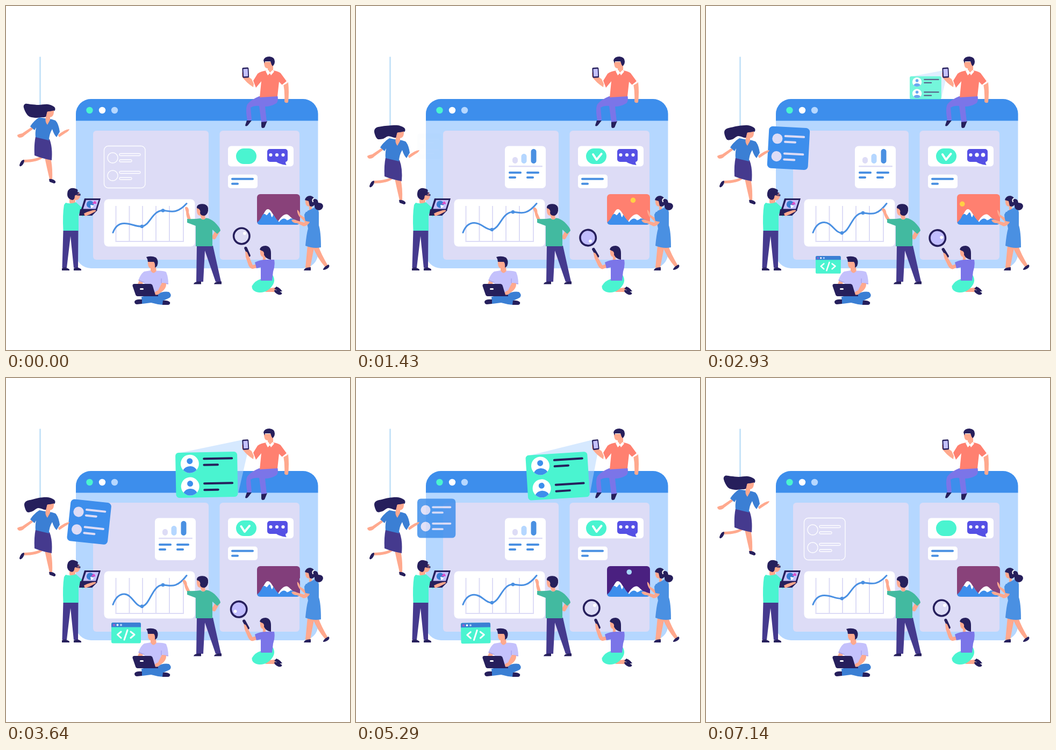
These frames come from a looping animation (640x640 px, 7210 ms). An HTML page:

```html
<!DOCTYPE html>
<html lang="en">
<head>
<meta charset="utf-8">
<title>Dashboard team</title>
<style>
html, body { margin: 0; width: 100%; height: 100%; overflow: hidden; background: #fff; }
svg { display: block; width: 100vw; height: 100vh; }
.navy { fill: #261f5c; } .skin { fill: #ffa98e; } .white { fill: #fff; }
.blue { fill: #3d8eec; } .denim { fill: #3b7fd4; } .sky { fill: #b5d7ff; }
.mist { fill: #dddcf6; } .mint { fill: #4af4d0; } .indigo { fill: #453a8e; }
.violet { fill: #7b75e8; } .coral { fill: #ff8070; } .green { fill: #42baa0; }
.lilac { fill: #c4c1fc; } .dress { fill: #4a90e2; }
.line { fill: none; stroke-width: 4; stroke-linecap: round; stroke-linejoin: round; }
.limb { fill: none; stroke: #ffa98e; stroke-width: 8; stroke-linecap: round; stroke-linejoin: round; }
.s-blue { stroke: #4a90e2; } .s-mist { stroke: #dddcf6; } .s-navy { stroke: #261f5c; } .s-white { stroke: #fff; }
</style>
</head>
<body>
<svg viewBox="0 0 640 640">
<defs>
  <clipPath id="photoClip"><rect x="467" y="350" width="80" height="57" rx="6"/></clipPath>
  <clipPath id="avatarClip"><circle cx="341.5" cy="158" r="17"/></clipPath>
  <g id="avatar">
    <circle class="white" cx="341.5" cy="158" r="17"/>
    <g class="blue" clip-path="url(#avatarClip)"><circle cx="341.5" cy="153" r="5.5"/><ellipse cx="341.5" cy="174" rx="13.5" ry="11.5"/></g>
  </g>
</defs>

<!-- browser window -->
<rect class="sky" x="130" y="173" width="450.500" height="315" rx="28"/>
<path class="blue" d="M130 213.500V201a28 28 0 0 1 28-28H552.500a28 28 0 0 1 28 28V213.500z"/>
<circle class="mint" cx="155.500" cy="194" r="6.200"/><circle class="white" cx="179" cy="194" r="6.200"/><circle class="sky" cx="202" cy="194" r="6.200"/>
<rect class="mist" x="162" y="232" width="215" height="240" rx="6"/>
<rect class="mist" x="397.500" y="232" width="148.500" height="240" rx="6"/>
<g id="trims"></g>

<!-- line chart -->
<rect class="white" x="182.500" y="359.500" width="169" height="88" rx="8"/>
<path class="s-mist" fill="none" stroke-width="2" d="M204.500 372V438H330V372M229.500 372V438M254 372V438M279 372V438M304 372V438"/>
<path id="curve" class="line s-blue" style="stroke-width:3"/>
<circle id="dotA" class="dress" cx="253" r="3.300"/><circle id="dotB" class="dress" cx="292" r="3.300"/>

<!-- status and chat -->
<rect class="white" x="413" y="260.500" width="122" height="38" rx="6"/>
<rect class="mint" x="428" y="265" width="38" height="29" rx="14.500"/>
<path id="check" class="line s-white" d="M439.500 276L446 286L455 275" pathLength="1" stroke-dasharray="1 2"/>
<path fill="#5550e5" d="M491 266H519a5 5 0 0 1 5 5V285a5 5 0 0 1-4 5q0 4 2 6q-12-1-19-6H491a5 5 0 0 1-5-5V271a5 5 0 0 1 5-5z"/>
<g id="dots" class="white"><circle cx="492.500" cy="277"/><circle cx="504" cy="277"/><circle cx="515.500" cy="277"/></g>
<rect class="white" x="413" y="313.500" width="55" height="25.500" rx="5"/>
<path class="line s-blue" d="M421 321.700H459M421 330.700H431"/>

<!-- landscape -->
<g clip-path="url(#photoClip)">
  <rect id="dusk" x="467" y="350" width="80" height="57"/>
  <circle id="sun" r="4.800" fill="#ffd045"/><circle id="moon" r="4.800" fill="#a8d6f8"/>
  <path class="white" d="M467 406C477 396 481 378 487 378S496 388 506 401C513 390 518 387.500 522 387.500S531 395 540 402L547 407H467z"/>
  <path class="blue" d="M467 407V403C472 399 475 394 477 389Q481 385 483 388T488 386T493 389T497 388Q502 396 508 402Q513 395 517 395.500T522 398T530 395Q538 396 547 403V407z"/>
</g>

<!-- blue profile card -->
<g id="profile">
  <rect class="blue" x="114" y="222" width="76" height="78" rx="7"/>
  <circle class="mist" cx="130.500" cy="244.500" r="9.600"/><circle class="mist" cx="130.500" cy="277.500" r="9.600"/>
  <path class="line s-mist" d="M145 239H179.500M145 249.700H164M145 271.500H179.500M145 282.500H164"/>
</g>

<!-- woman on the rope -->
<path id="rope" stroke="#b5dbf6" stroke-width="2.200"/>
<g id="flyer">
  <path class="skin" d="M48 225L30 237Q24 238 21 240Q21 244 25 245Q31 245 34 241L50 229zM97 240Q108 230 118 229Q117 233 111 236L99 244zM67 278Q59 285 33 286L32 291Q61 291 70 281zM72 282Q76 301 81 322H86Q87 300 83 283z"/>
  <path class="navy" d="M33 286Q28 286 25 296Q25 299 28 298Q34 294 34 287zM80 322Q87 321 92 326Q93 330 89 330L81 327z"/>
  <path class="indigo" d="M55 243L81 248Q87 263 85 287Q68 284 53 278Q52 257 55 243z"/>
  <path class="denim" d="M62 207Q52 213 45 224L53 231L56 226Q54 236 55 244L80 250Q80 239 86 229Q89 239 94 244L100 234Q98 219 92 213Q85 210 78 210z"/>
  <path id="hair" class="navy"/>
  <path class="skin" d="M75 197L89 194Q90 206 82 207L82 212L77 221Q72 215 74 207z"/>
  <path class="navy" d="M72 191Q82 182 91 193Q85 197 77 195L74 207z"/>
</g>

<!-- man with tablet -->
<path class="skin" d="M118 358H129V367Q123 371 118 366z"/>
<path class="mint" d="M111 366Q121 369 130 365Q140 373 149 384L143 392L135 386V418H106.500Q105 388 108 370z"/>
<path class="indigo" d="M106.500 418H134.500L134 487H126L120 428L113 487H104.500z"/>
<path class="navy" d="M104 492V488Q110 484 118 490V492zM126 492V488Q134 484 140 490V492zM146 358H176L169 381H139zM138 378L170 380L160 390H136z"/>
<path class="lilac" d="M149 361H172.500L167 377.500H143.500z"/>
<circle class="denim" cx="156.500" cy="369" r="6.700"/>
<path id="slice" fill="#d94fc5" d="M160 368L165 362.500Q169 365 168 368z"/>
<path class="white" d="M157 370L163.500 371Q162 375 158 376z"/>
<path class="skin" d="M145 386Q157 380 166 379.500Q169 381 165 383Q157 388 147 391z"/>
<g id="tabletHead">
  <path class="skin" d="M126 346H136L138 354Q136 362 128 361z"/>
  <path class="navy" d="M133 346Q135 341 130 340Q120 336 115 344Q111 358 123 361Q128 361 128 353Q131 350 137 347z"/>
  <path class="line s-navy" style="stroke-width:1.300" d="M127 350H138V352H133z"/>
</g>

<!-- code window and man with laptop -->
<g id="code">
  <rect class="mint" x="196" y="455" width="55" height="38.500" rx="3"/>
  <path class="denim" d="M196 463.500V458a3 3 0 0 1 3-3H248a3 3 0 0 1 3 3V463.500z"/>
  <circle cx="201" cy="459.500" r="1.900" fill="#a35bc9"/><circle class="white" cx="207.500" cy="459.500" r="1.900"/><circle class="sky" cx="214" cy="459.500" r="1.900"/>
  <path class="line s-white" style="stroke-width:3" d="M214 472L207.500 477.500L214 483.500M226 469L220 487M232 472L239 477.500L232 483.500"/>
</g>
<path class="limb" d="M252 511L249 518"/>
<path class="skin" d="M264 474H279V486L280 495Q274 503 269 494V488Q263 487 264 474z"/>
<path class="lilac" d="M257 494Q264 493 269 492Q274 501 280 492.500Q294 492 298 495Q302 504 302 517L290 514L287 535H258V515L246 511Q250 499 257 494z"/>
<path fill="none" stroke="#a9a4ef" stroke-width="1.500" d="M247 510L258 515M289 507V515L302 517"/>
<path class="navy" d="M261 467Q271 464 279 468Q285 474 281 484L277 487Q278 479 275 476H264Q264 471 261 467z"/>
<path class="denim" d="M252 541Q270 537 280 537Q292 530 303 532Q310 538 304 543L293 548L292 556Q280 555 270 552L253 554z"/>
<path class="navy" d="M253 546Q241 545 239 550Q239 555 244 555L253 554zM292 548Q300 547 305 551Q306 555 302 556L291 556z"/>
<path class="skin" d="M290 515L298 516Q299 526 288 533Q280 540 275 537Q275 532 283 529z"/>
<path class="navy" d="M239 517H268Q272 517 273 521L278 537.500H283V540H245Q242 540 241 537L235.500 521Q235 517 239 517z"/>
<rect class="white" x="249" y="525" width="7" height="3" rx="1.500"/>

<!-- man at the chart -->
<path class="limb" d="M394 418L387 430"/>
<g id="pointer"><path class="skin" d="M341 402Q335 393 335 383L333 376Q333 373 337 374Q341 377 340 384L345 401z"/></g>
<path class="skin" d="M355 375H368L371 396Q364 402 362 390Q354 391 355 375z"/>
<path class="indigo" d="M355 446H385L400 513H390L370 455L367 513H354z"/>
<path class="navy" d="M349 517.500Q350 512 363 512.500V517.500zM387 517.500Q388 512 401 512.500V517.500z"/>
<path class="green" d="M337 396Q350 397 362 395Q367 400 372 394.500Q378 394 388 402Q399 413 399 418L393 424L384 416V447H353V409L337 403z"/>
<path class="navy" d="M355 376Q354 370 362 368.500Q374 367 376 376Q377 386 370 390Q362 391 361 385Q363 378 355 376z"/>

<!-- kneeling woman -->
<path class="skin" d="M480 526L500 524L503 532H483zM473 454H483V474H478V467Q472 466 473 454z"/>
<path class="mint" d="M474 508L495 499Q502 509 497 518Q487 534 471 533Q457 531 457.500 521Q463 511 474 508z"/>
<path class="navy" d="M503 522Q511 525 514 531L508 531L499 526zM500 528Q508 529 513.500 534Q513 538 507 537Q500 534 499 530z"/>
<g id="lens">
  <circle class="mist" cx="438.300" cy="428" r="14.700"/>
  <circle id="glass" fill="#c1bdff" cx="438.300" cy="428" r="14.700"/>
  <circle fill="none" class="s-navy" stroke-width="3.600" cx="438.300" cy="428" r="14.700"/>
  <circle id="glint" class="white" cx="444" cy="423" r="2.900"/>
  <path class="line s-navy" style="stroke-width:5.500" d="M446 450.500L452 464"/>
  <path class="skin" d="M445 457Q448 456 450 461L459 482L467 480V487L459 489Q454 489 451 482L446 467z"/>
</g>
<path class="violet" d="M463 477Q473 472 483 472L499 472Q501 483 497 494L495 511H474L474 486L466 488z"/>
<path class="navy" d="M472 453Q474 446 483 446Q493 447 493 460V472Q484 471 480 463Q481 456 475 455z"/>

<!-- woman at the landscape -->
<path class="skin" d="M559 396L547 388Q546 382 542 379Q541 385 546 392L557 402zM561 445H574L566 487H557zM570 446L581 446Q586 461 599 483L594 486Q579 469 570 446zM557 360H569V380H564V373Q556 373 557 360z"/>
<path class="navy" d="M554 492Q555 486 567 486V492zM590 491Q590 486 600 481Q603 483 600 487Q595 491 590 491z"/>
<path class="dress" d="M561 381Q567 379 575 374Q582 378 582 384L582 408Q586 420 586 449Q572 452 557 446Q559 424 562 414L557 390z"/>
<path class="skin" d="M566 400Q563 408 554 410Q544 405 541 404Q533 404 531 398Q536 396 541 399L555 403L558 395z"/>
<path class="dress" d="M558 383L570 382L567 402L557 400Q555 393 555 388z"/>
<path class="navy" d="M556 361Q558 353 566 353Q572 354 574 359Q580 358 581 366Q590 366 590 373Q588 380 582 380Q573 379 574 370Q570 375 565 372L563 363z"/>
<path class="line s-white" style="stroke-width:2" d="M573 358Q569 360 571 364"/>

<!-- projected contacts -->
<g id="projection">
  <path id="beam" fill="#b5d7ff" opacity=".55"/>
  <g id="contacts">
    <rect class="mint" x="315" y="137" width="115" height="84" rx="6"/>
    <use href="#avatar"/><use href="#avatar" y="42"/>
    <path class="line s-navy" d="M368 149H420M368 160.500H393.500M368 195H420M368 207H393.500"/>
  </g>
</g>

<!-- man with phone -->
<path class="skin" d="M516 145L525 142Q527 160 525 179Q521 182 518 178Q519 160 516 145zM439 124Q442 122 449 129Q453 134 457 136L461 145L460 151Q446 142 439 131z"/>
<path class="skin" d="M480 104H497V120L494 126H487V116Q480 117 480 104z"/>
<path class="navy" d="M448 213H457L450 222Q446 225 445 222zM475 214H486L481 226Q475 229 475 223z"/>
<path class="violet" d="M471 168H505.500Q507 177 503 181Q493 187 482 187L485 215L475 216L471 186Q462 185 455 189L457 212L449 213Q445 191 449 183Q456 174 471 168z"/>
<path class="coral" d="M468 126Q474 121 486 120L491 126L496 120Q506 121 511 125L522 140L514 147L508 141L505 168L472 170L475 140L465 152L460 139Z"/>
<path class="white" d="M483 121L488 119L491 124L496 119L499 122L493 129L491 125L487 129zM513 147L522 140L524 143L515 148z"/>
<path class="navy" d="M479 101Q481 94 490 94Q500 95 500 103Q500 109 496 112L494 109L492 103H482L481 107z"/>
<g id="phone"><rect class="navy" x="439.800" y="114.500" width="12" height="19" rx="2" transform="rotate(-3 446 124)"/><rect class="lilac" x="441.800" y="117" width="8.200" height="14" transform="rotate(-3 446 124)"/></g>
</svg>
<script>
const LOOP = 7210;
const $ = id => document.getElementById(id);
const set = (node, attrs) => { for (const k in attrs) node.setAttribute(k, attrs[k]); };
const clamp = u => Math.max(0, Math.min(1, u));
const mix = (a, b, u) => a + (b - a) * u;
const ease = u => (1 - Math.cos(Math.PI * clamp(u))) / 2;
const ramp = (t, start, end) => ease((t - start) / (end - start));

// Finds the step around t and blends its two values.
function track(t, steps, curve = ease, blend = mix) {
  let i = 0;
  while (i < steps.length - 2 && t >= steps[i + 1][0]) i++;
  const [t0, a] = steps[i], [t1, b] = steps[i + 1];
  return blend(a, b, curve(clamp((t - t0) / (t1 - t0))));
}
const linear = u => u;

// Anticlockwise outline; turn = 1 starts one corner later.
function outline(x, y, w, h, r, turn = 0) {
  const centres = [[x + w - r, y + h - r], [x + w - r, y + r], [x + r, y + r], [x + r, y + h - r]];
  const pts = [];
  for (let k = 0; k < 4; k++) {
    const c = (k + turn) % 4;
    for (let j = 0; j <= 8; j++) {
      const a = Math.PI / 2 * (1 - c - j / 8);
      pts.push([centres[c][0] + r * Math.cos(a), centres[c][1] + r * Math.sin(a)]);
    }
  }
  return [...pts, pts[0]];
}

function trimmed(pts, share) {
  if (share <= 0) return '';
  const size = (p, q) => Math.hypot(q[0] - p[0], q[1] - p[1]);
  let left = share * pts.slice(1).reduce((sum, p, i) => sum + size(pts[i], p), 0);
  const out = [pts[0]];
  for (let i = 1; i < pts.length && left > 0; i++) {
    const [p, q] = [pts[i - 1], pts[i]], len = size(p, q), u = len ? Math.min(1, left / len) : 1;
    out.push([mix(p[0], q[0], u), mix(p[1], q[1], u)]);
    left -= len;
  }
  return 'M' + out.map(p => p.map(v => v.toFixed(2)).join(' ')).join('L');
}

function addTrim(pts, attrs) {
  const node = document.createElementNS('http://www.w3.org/2000/svg', 'path');
  set(node, attrs);
  $('trims').append(node);
  return { node, pts };
}
const wire = { fill: 'none', stroke: '#fff', 'stroke-width': 1.3 };
const wires = [addTrim(outline(182.5, 260.5, 76.5, 78, 8), wire)];
for (const y of [282.5, 315.5]) {
  wires.push(addTrim(outline(189, y - 9.5, 19, 19, 9.5, 1), wire));
  wires.push(addTrim(outline(211, y - 8, 39, 4, 1.9), wire));
  wires.push(addTrim(outline(211, y + 3.5, 23, 4, 1.9), wire));
}
const solids = [
  [277, 260.5, 76, 78.5, 7, '#fff'],
  [291, 281, 10, 12, 5, '#dddcf6'], [307.5, 275, 10, 18, 5, '#b5d7ff'], [325.5, 266, 10, 27, 5, '#4a90e2'],
  [284, 297, 63, 2.6, 1.3, '#dddcf6'],
  ...[284, 317].flatMap(x => [[x, 308, 24, 4, 2, '#4a90e2'], [x, 317, 14, 4, 2, '#4a90e2']])
].map(([x, y, w, h, r, fill]) => addTrim(outline(x, y, w, h, r), { fill }));

const hairRoot = [74, 206, 78, 197, 90, 195, 90, 188, 78, 183];
const hairPose = {
  rest: [61, 184, 47, 183, 36, 182, 33, 189, 41, 204, 54, 208, 64, 207],
  lifted: [61, 179, 50, 172, 38, 171, 33, 180, 41, 195, 54, 202, 65, 205],
  level: [61, 184, 49, 187, 38, 190, 34, 197, 39, 210, 49, 209, 60, 203],
  hanging: [61, 187, 52, 194, 44, 198, 40, 209, 44, 219, 53, 213, 62, 208]
};
const hairSteps = [[0, 'rest'], [790, 'lifted'], [1600, 'level'], [5600, 'level'], [6430, 'hanging'], [7140, 'rest']]
  .map(([t, name]) => [t, hairPose[name]]);
const mixLists = (a, b, u) => a.map((v, i) => mix(v, b[i], u));

// Closed Catmull-Rom curve through a flat list of coordinates.
function smooth(flat) {
  const n = flat.length / 2, at = i => [flat[2 * ((i + n) % n)], flat[2 * ((i + n) % n) + 1]];
  let d = 'M' + at(0);
  for (let i = 0; i < n; i++) {
    const [p, a, b, q] = [at(i - 1), at(i), at(i + 1), at(i + 2)];
    d += 'C' + a.map((v, k) => v + (b[k] - p[k]) / 6) + ' ' + b.map((v, k) => v - (q[k] - a[k]) / 6) + ' ' + b;
  }
  return d;
}

const scaleAt = (x, y, s) => `translate(${x} ${y}) scale(${s}) translate(${-x} ${-y})`;

function drawFlyer(t) {
  const drop = 39 * (ramp(t, 0, 1210) - ramp(t, 5615, 7070));
  set($('flyer'), { transform: `translate(0 ${drop})` });
  set($('rope'), { d: `M63.500 94.500V${185 + drop}` });
  const pose = track(t, hairSteps, ease, mixLists);
  const sway = 0.8 * Math.sin(t / LOOP * 8 * Math.PI);
  set($('hair'), { d: smooth([...hairRoot, ...pose.map((v, i) => i % 2 && i > 1 && i < 11 ? v + sway : v)]) });

  const show = ramp(t, 1400, 1900) * (1 - ramp(t, 5150, 5700));
  const tilt = track(t, [[2200, 0], [3640, 6], [5100, 0]]);
  set($('profile'), { opacity: show, transform: `rotate(${tilt} 90 290) ` + scaleAt(114, 261, mix(0.6, 1, show)) });
}

function drawWindow(t) {
  const near = Math.max(0, Math.min(t, 7145 - t));
  for (const { node, pts } of wires) set(node, { d: trimmed(pts, 1 - near / 1070) });
  for (const { node, pts } of solids) set(node, { d: trimmed(pts, clamp((near - 200) / 1180)) });

  const swing = 1 - Math.abs(1 - 2 * t / LOOP);
  const dip = 410 + 15 * swing, crest = 404.5 - 2.5 * swing, peak = 380.5 + 4.5 * Math.min(1, swing * 1.5);
  set($('curve'), { d: `M199 421.500C204 408 212 ${crest} 220 ${crest}C234 ${crest} 241 ${dip + 1} 253 ${dip}C268 ${dip - 2} 272 ${peak} 292 ${peak}C304 ${peak} 316 ${peak + 9} 336 367.500` });
  set($('dotA'), { cy: dip });
  set($('dotB'), { cy: peak });

  const drawn = clamp((t - 150) / 500) * clamp((7080 - t) / 500);
  const slide = track(t, [[790, 0], [2140, 3.5], [3640, -2], [5290, 1.5], [6430, 0]]);
  set($('check'), { 'stroke-dashoffset': 1 - drawn, opacity: drawn > 0.01 ? 1 : 0, transform: `translate(${slide})` });
  [...$('dots').children].forEach((dot, i) => {
    const u = clamp((t % 1803 - 590 - 220 * i) / 400);
    set(dot, { r: 3.1 + (t < 5400 ? Math.sin(Math.PI * u) : 0) });
  });

  const day = track(t, [[0, .35], [790, 1], [3180, 1], [3850, 0], [5570, 0], [6430, .28], [7070, .35], [LOOP, .35]], linear);
  set($('dusk'), { fill: `rgb(${mixLists([74, 32, 128], [255, 128, 112], day).map(Math.round)})` });
  for (const [id, start] of [['sun', 0], ['moon', 3580]]) {
    const x = 552.4 - 0.0258 * (t - start);
    set($(id), { cx: x, cy: 361 + 0.0075 * (x - 508) ** 2 });
  }
}

function drawHelpers(t) {
  const turn = ramp(t, 0, 2190) - ramp(t, 2500, 4690), reach = Math.max(0, turn) ** 0.6;
  set($('lens'), { transform: `rotate(${-8 * reach} 462 487)` });
  set($('glass'), { opacity: clamp(reach * 5) });
  set($('glint'), { transform: `rotate(${-360 * turn + 8 * reach} 438.3 428)` });

  const point = track(t, [[900, 0], [1900, 1], [3200, 1], [4400, 0]]);
  set($('pointer'), { transform: `rotate(${-13 * point} 344 404)` });
  const nod = track(t, [[790, 0], [2000, 1], [4800, 1], [6200, 0]]);
  set($('tabletHead'), { transform: `rotate(${5 * nod} 124 362) translate(${-1.2 * nod} 0)` });
  set($('slice'), { transform: `translate(${-2 * nod} ${1.5 * nod})` });

  const pop = ramp(t, 2430, 3100) * (1 - ramp(t, 5950, 6650));
  const lean = track(t, [[3640, 0], [4900, -1.3], [5900, 0]]);
  set($('code'), { opacity: clamp(pop * 1.3), transform: `rotate(${lean} 249.5 522) ` + scaleAt(249.5, 522, pop) });
}

function drawProjection(t) {
  const grow = ramp(t, 2500, 3350) * (1 - ramp(t, 6450, 7160));
  const tilt = track(t, [[3100, 0], [4800, -4.6], [6350, 0]]), a = tilt * Math.PI / 180;
  const corner = (x, y) => [430 + x * Math.cos(a) - y * Math.sin(a), 137 + x * Math.sin(a) + y * Math.cos(a)];
  set($('projection'), { opacity: clamp(grow * 1.5), transform: scaleAt(446, 124, grow) });
  set($('contacts'), { transform: `rotate(${tilt} 430 137)` });
  set($('beam'), { d: `M440 115L${corner(-110, 1)}L${corner(0, 80)}L451 132z` });
  set($('phone'), { transform: `rotate(${tilt} 446 124)` });
}

function frame(now) {
  const t = now % LOOP;
  drawFlyer(t);
  drawWindow(t);
  drawHelpers(t);
  drawProjection(t);
  requestAnimationFrame(frame);
}
frame(0);
</script>
</body>
</html>
```
